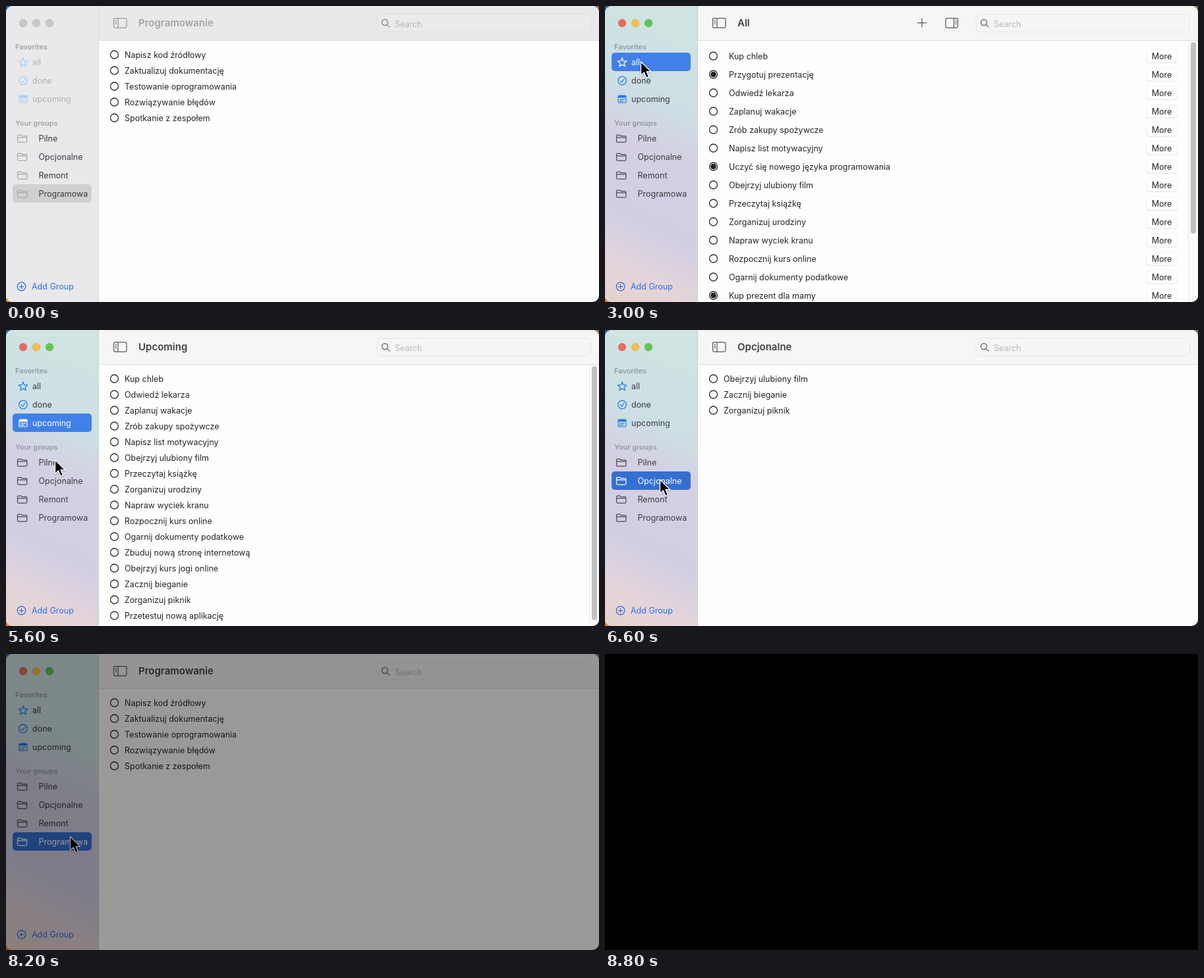
Animation of 900x450 px, one loop 9 s. Source, as an HTML page:

```html
<!DOCTYPE html>
<html lang="pl">
<head>
<meta charset="utf-8">
<title>Task list</title>
<style>
html, body { margin: 0; width: 100%; height: 100%; overflow: hidden; background: #000; }
svg { display: block; width: 900px; height: 450px; }
text { font: 12.5px Inter, "Open Sans", sans-serif; white-space: pre; }
.title { font-size: 15px; font-weight: 600; }
.head { font-size: 11px; font-weight: 600; }
.line { fill: none; stroke-width: 1.25; stroke-linecap: round; stroke-linejoin: round; }
</style>
</head>
<body>
<svg viewBox="0 0 900 450">
  <defs>
    <linearGradient id="side" x1=".15" y1="0" x2="0" y2="1">
      <stop offset="0" stop-color="#cfe3e2"/>
      <stop offset=".25" stop-color="#cddfe4"/>
      <stop offset=".42" stop-color="#d5cfe2"/>
      <stop offset=".68" stop-color="#d1cee4"/>
      <stop offset=".87" stop-color="#e5d5da"/>
      <stop offset="1" stop-color="#e5d2cc"/>
    </linearGradient>
    <clipPath id="frame"><rect width="900" height="450" rx="10"/></clipPath>
    <filter id="soft" x="-50%" y="-50%" width="200%" height="200%">
      <feDropShadow dx="0" dy="1" stdDeviation="1" flood-opacity=".35"/>
    </filter>
  </defs>
  <path fill="#2f5f9f" d="M0 0h12v12H0z"/>
  <path fill="#8a7658" d="M888 0h12v12h-12z"/>
  <path fill="#c48a34" d="M0 438h12v12H0z"/>
  <path fill="#20222a" d="M888 438h12v12h-12z"/>
  <g id="app" clip-path="url(#frame)"></g>
  <path id="cursor" filter="url(#soft)" fill="#000" stroke="#fff" stroke-width="1.3" stroke-linejoin="round"
    d="M.5 .5V21.5L5.3 17 8.8 25 12.5 23.4 9.1 15.7H15.7Z"/>
  <rect id="shade" width="900" height="450"/>
</svg>
<script>
const LOOP = 9000, STEP = 200;
const FADE_START = 7800, FADE_TIME = 1000;

const tasks = ["Kup chleb", "*Przygotuj prezentację", "Odwiedź lekarza", "Zaplanuj wakacje",
  "Zrób zakupy spożywcze", "Napisz list motywacyjny", "*Uczyć się nowego języka programowania",
  "Obejrzyj ulubiony film", "Przeczytaj książkę", "Zorganizuj urodziny", "Napraw wyciek kranu",
  "Rozpocznij kurs online", "Ogarnij dokumenty podatkowe", "*Kup prezent dla mamy",
  "Zbuduj nową stronę internetową", "Obejrzyj kurs jogi online", "Zacznij bieganie",
  "Zorganizuj piknik", "Przetestuj nową aplikację"];
const isDone = task => task[0] === "*";
const coding = ["Napisz kod źródłowy", "Zaktualizuj dokumentację", "Testowanie oprogramowania",
  "Rozwiązywanie błędów", "Spotkanie z zespołem"];

// row: selected sidebar entry, thumb: scrollbar thumb height
const views = [
  { at: 0, row: 6, title: "Programowanie", list: coding, idle: true },
  { at: 2200, row: 0, title: "All", list: tasks.slice(0, 14), wide: true, thumb: 291 },
  { at: 4200, row: 1, title: "Done", list: tasks.filter(isDone) },
  { at: 5000, row: 2, title: "Upcoming", list: tasks.filter(t => !isDone(t)), thumb: 386 },
  { at: 5800, row: 3, title: "Pilne", list: [tasks[2], tasks[12], tasks[10]] },
  { at: 6600, row: 4, title: "Opcjonalne", list: [tasks[7], tasks[16], tasks[17]] },
  { at: 7400, row: 5, title: "Remont", list: ["Zaprojektuj kuchnię", "Kup materiały budowlane"] },
  { at: 8000, row: 6, title: "Programowanie", list: coding }
];

// time, x, y
const path = [[700, 240, 455], [1800, 57, 91], [2200, 54, 84], [3400, 54, 84], [4000, 54, 107],
  [4300, 55, 109], [4800, 61, 137], [5000, 62, 138], [5600, 74, 197], [6000, 76, 200],
  [6500, 82, 226], [6700, 84, 228], [7200, 92, 254], [7400, 92, 255], [7800, 96, 274], [8200, 97, 277]];

const text = (x, y, s, fill, more = "") => `<text x="${x}" y="${y}" fill="${fill}" ${more}>${s}</text>`;
const rect = (x, y, w, h, r, fill, more = "") =>
  `<rect x="${x}" y="${y}" width="${w}" height="${h}" rx="${r}" fill="${fill}" ${more}/>`;
const disc = (x, y, r, fill, more = "") => `<circle cx="${x}" cy="${y}" r="${r}" fill="${fill}" ${more}/>`;
const line = (d, stroke) => `<path class="line" d="${d}" stroke="${stroke}"/>`;
const ring = (x, y, r, stroke, width = 1.3) => disc(x, y, r, "none", `stroke="${stroke}" stroke-width="${width}"`);

function star(x, y) {
  const points = Array.from({ length: 10 }, (_, i) => {
    const r = i % 2 ? 3.1 : 7.2, a = i * Math.PI / 5;
    return (x + r * Math.sin(a)).toFixed(2) + " " + (y - r * Math.cos(a)).toFixed(2);
  });
  return "M" + points.join("L") + "Z";
}

const icons = [
  (y, c) => line(star(26, y + .5), c),
  (y, c) => ring(26, y, 6.3, c) + line(`M23.2 ${y + .3}l2.1 2.4 3.6-5`, c),
  (y, c) => rect(20, y - 5.5, 12, 11, 2, "none", `stroke="${c}" stroke-width="1.2"`) +
    rect(20, y - 5.5, 12, 3.6, 1, c) + line(`M22.5 ${y + .5}h7M22.5 ${y + 3}h4.5`, c)
];
const folder = (y, c) => line(`M17.5 ${y - 4}q0-1.5 1.5-1.5h3.5l1.8 1.5h6q1.5 0 1.5 1.5v6.5` +
  `q0 1.5-1.5 1.5h-11.3q-1.5 0-1.5-1.5zM17.5 ${y - 1.7}h14.3`, c);

function sidebar({ row, idle }) {
  const names = ["all", "done", "upcoming", "Pilne", "Opcjonalne", "Remont", "Programowa"];
  const lights = idle ? ["#c8c8ca", "#c8c8ca", "#c8c8ca"] : ["#ec6a5e", "#f4be4f", "#62c454"];
  const headFill = idle ? "#a3a3a6" : "#929aa3";
  let out = rect(0, 0, 141, 450, 0, idle ? "#e9e9eb" : "url(#side)");
  lights.forEach((c, i) => out += disc(26 + 20 * i, 26, 6, c, 'stroke="#000" stroke-opacity=".08"'));
  out += text(14, 66, "Favorites", headFill, 'class="head"') + text(14, 182, "Your groups", headFill, 'class="head"');
  names.forEach((name, i) => {
    const group = i > 2, y = group ? 201.5 + 28 * (i - 3) : 85.5 + 28 * i;
    const on = i === row;
    let ink = idle && !group ? "#b0b0b3" : "#3c3c41";
    let tint = group ? (idle ? "#a9a9ac" : "#4c4c52") : (idle ? "#a6cdf6" : "#217ce6");
    if (on) {
      out += rect(10, y - 14.5, 120, 28, 5, idle ? "#d0d0d1" : group ? "#356fd2" : "#4180e9");
      if (!idle) ink = tint = "#fff";
    }
    out += (group ? folder : icons[i])(y, tint) + text(group ? 49.5 : 40, y + 4.5, name, ink);
  });
  const blue = "#2f6edf";
  return out + ring(23.5, 426.5, 6.3, blue) + line("M20.5 426.5h6M23.5 423.5v6", blue) +
    text(39, 431, "Add Group", blue);
}

function toolbar({ title, idle, wide }) {
  const ink = idle ? "#99999c" : "#5a5a5c";
  let out = rect(141, 0, 759, 52, 0, idle ? "#e9e9eb" : "#f6f6f6") + rect(141, 52, 759, 1, 0, "#dcdde0") +
    rect(140, 0, 1, 450, 0, idle ? "#d9d9db" : "#cbcdd5") +
    line("M166 18.5h14.5q2.5 0 2.5 2.5v9.5q0 2.5-2.5 2.5h-14.5q-2.5 0-2.5-2.5v-9.5q0-2.5 2.5-2.5zM170 18.5v14.5M166 22h1.5M166 24.5h1.5M166 27h1.5", ink) +
    text(201, 31, title, idle ? "#a4a4a7" : "#414143", 'class="title"');
  if (wide) out += line("M474.5 25.5h13M481 19v13", ink) +
    line("M519.5 18.5h13.5q2.5 0 2.5 2.5v9.5q0 2.5-2.5 2.5h-13.5q-2.5 0-2.5-2.5v-9.5q0-2.5 2.5-2.5zM529.5 18.5v14.5M532 22h1.3M532 24.5h1.3M532 27h1.3", ink);
  return out + rect(563, 12.5, 324.5, 27, 6, idle ? "#ebebed" : "#f5f5f5", `stroke="${idle ? "#dcdcdf" : "#e5e6e7"}"`) +
    ring(575, 25, 4.5, idle ? "#8b8b8e" : "#6c6c6e", 1.4) + line("M578.4 28.4l3.6 3.8", idle ? "#8b8b8e" : "#6c6c6e") +
    text(590, 32, "Search", "#b8b8bb");
}

function content({ title, list, wide, thumb }) {
  let out = "";
  list.forEach((task, i) => {
    const y = wide ? 76 + 28 * i : 74 + 24 * i, done = isDone(task);
    out += ring(164.5, y, 6, "#303032", 1.35) + (done ? disc(164.5, y, 4.3, "#222224") : "") +
      text(wide ? 188 : 180, y + 5, done ? task.slice(1) : task, "#262628");
    if (wide) out += rect(821.5, y - 9, 47.5, 20, 5, "#000", 'opacity=".1"') +
      rect(822, y - 10, 46.5, 20, 5, "#fff", 'stroke="#eee" stroke-width=".7"') +
      text(845, y + 4.5, "More", "#262628", 'text-anchor="middle"');
  });
  if (thumb) out += rect(885, 53, 15, 397, 0, "#fafafa") + rect(885, 53, 1, 397, 0, "#e8e8e8") +
    rect(889, 55, 8, thumb, 4, "#c1c1c1");
  return out;
}

const app = document.getElementById("app");
const cursor = document.getElementById("cursor");
const shade = document.getElementById("shade");
let shown;

function cursorAt(t) {
  const next = path.findIndex(p => p[0] > t);
  if (next < 0) return path[path.length - 1].slice(1);
  const [t0, x0, y0] = path[next - 1], [t1, x1, y1] = path[next];
  const k = (t - t0) / (t1 - t0), ease = k * k * (3 - 2 * k);
  return [x0 + (x1 - x0) * ease, y0 + (y1 - y0) * ease];
}

function draw(now) {
  const t = Math.floor(now % LOOP / STEP) * STEP;
  const view = views.filter(v => v.at <= t).pop();
  if (view !== shown) {
    shown = view;
    app.innerHTML = rect(0, 0, 900, 450, 0, "#fefefd") + content(view) + sidebar(view) + toolbar(view);
  }
  const visible = t >= path[0][0];
  cursor.setAttribute("visibility", visible ? "visible" : "hidden");
  if (visible) cursor.setAttribute("transform", `translate(${cursorAt(t)})`);
  shade.setAttribute("opacity", Math.min(1, Math.max(0, (t - FADE_START) / FADE_TIME)));
}

const start = performance.now();
function tick() {
  draw(performance.now() - start);
  requestAnimationFrame(tick);
}
tick();
</script>
</body>
</html>
```
